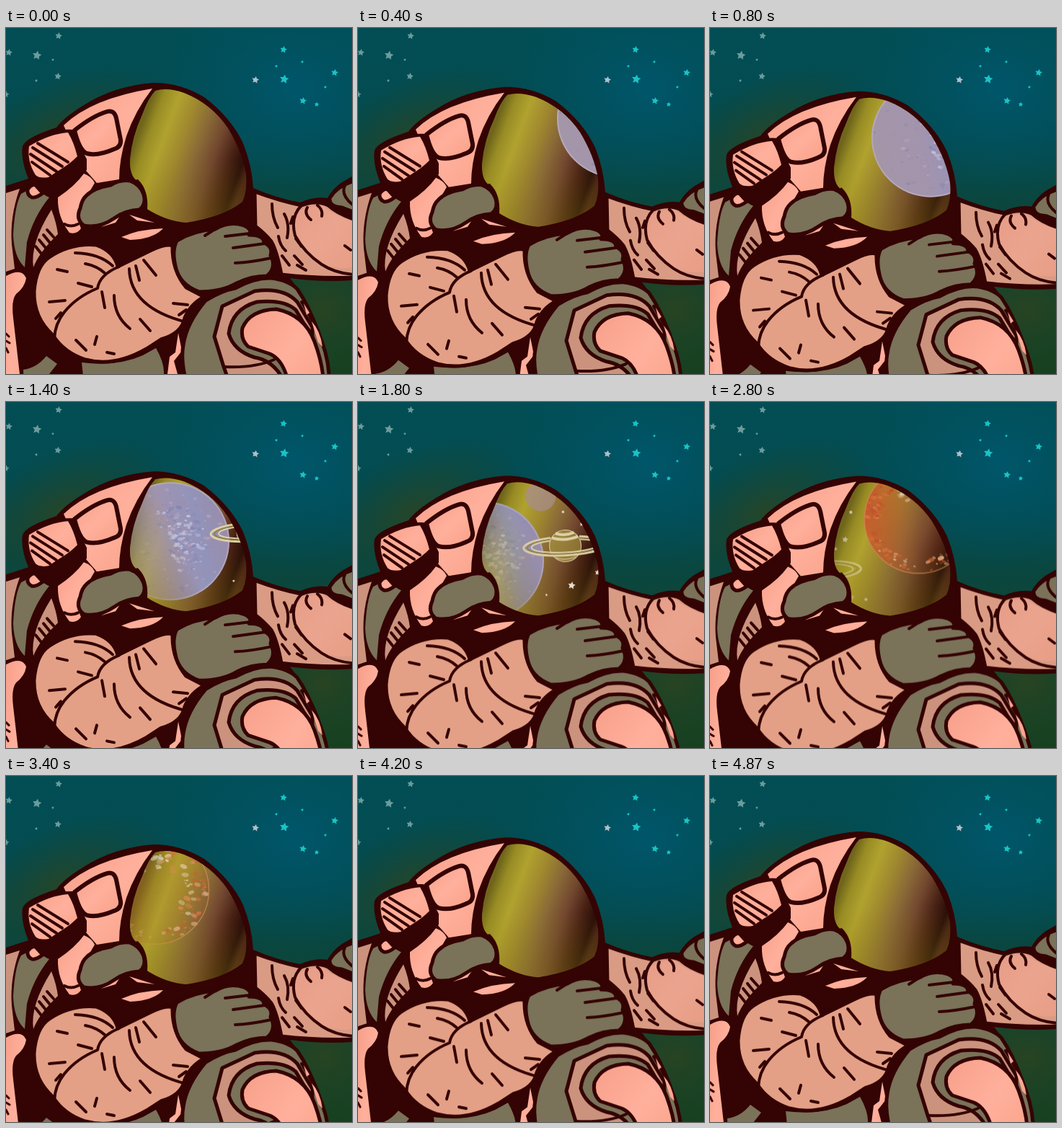
Write an HTML page that moves like this. It is 480 by 480 pixels and loops after 4.94 s.

```html
<!DOCTYPE html>
<html lang="en">
<head>
<meta charset="utf-8">
<title>Astronaut</title>
<style>
html, body { margin: 0; width: 100%; height: 100%; overflow: hidden; background: #034a4d; }
svg { display: block; width: 100%; height: 100%; }
.ink { fill: none; stroke: #340303; stroke-width: 4; stroke-linecap: round; stroke-linejoin: round; }
.part { stroke: #340303; stroke-width: 5; stroke-linejoin: round; }
.dark { fill: #340303; }
.skin { fill: url(#skin); }
.arm { fill: #e3a086; }
.dim { fill: #cb927d; }
.grey { fill: #7a7259; }
</style>
</head>
<body>
<svg viewBox="0 0 480 480">
  <defs>
    <linearGradient id="sky" x2="0" y2="1">
      <stop offset="0" stop-color="#024e54"/>
      <stop offset=".3" stop-color="#034b51"/>
      <stop offset=".47" stop-color="#094741"/>
      <stop offset=".7" stop-color="#13432e"/>
      <stop offset="1" stop-color="#17401f"/>
    </linearGradient>
    <radialGradient id="glow">
      <stop offset="0" stop-color="#00566a"/>
      <stop offset=".45" stop-color="#005466" stop-opacity=".6"/>
      <stop offset="1" stop-color="#005466" stop-opacity="0"/>
    </radialGradient>
    <radialGradient id="moss">
      <stop offset="0" stop-color="#2d4420" stop-opacity=".8"/>
      <stop offset="1" stop-color="#1c4428" stop-opacity="0"/>
    </radialGradient>
    <linearGradient id="skin" x2="1" y2="1">
      <stop offset="0" stop-color="#f79f8a"/>
      <stop offset=".5" stop-color="#ffb09c"/>
      <stop offset="1" stop-color="#f9a088"/>
    </linearGradient>
    <linearGradient id="gold" gradientUnits="userSpaceOnUse" x1="175" y1="170" x2="325" y2="225">
      <stop offset="0" stop-color="#6f651b"/>
      <stop offset=".09" stop-color="#978b24"/>
      <stop offset=".22" stop-color="#b1a22f"/>
      <stop offset=".38" stop-color="#9f882f"/>
      <stop offset=".53" stop-color="#8a6a37"/>
      <stop offset=".69" stop-color="#71462f"/>
      <stop offset=".83" stop-color="#482114"/>
      <stop offset=".94" stop-color="#270c08"/>
      <stop offset="1" stop-color="#451f14"/>
    </linearGradient>
    <linearGradient id="low" gradientUnits="userSpaceOnUse" x1="0" y1="180" x2="0" y2="270">
      <stop offset="0" stop-color="#8c8010" stop-opacity="0"/>
      <stop offset="1" stop-color="#938515" stop-opacity=".35"/>
    </linearGradient>
    <linearGradient id="fade" gradientUnits="userSpaceOnUse" x1="172" y1="230" x2="250" y2="195">
      <stop offset="0" stop-color="#444"/>
      <stop offset="1" stop-color="#fff"/>
    </linearGradient>
    <linearGradient id="lilac" x1="0" y1=".6" x2="1" y2=".4">
      <stop offset="0" stop-color="#a496a8"/>
      <stop offset=".4" stop-color="#a394ad"/>
      <stop offset=".75" stop-color="#9293ba"/>
      <stop offset="1" stop-color="#9a8ca8"/>
    </linearGradient>
    <linearGradient id="ember">
      <stop offset="0" stop-color="#c9542e" stop-opacity=".95"/>
      <stop offset=".25" stop-color="#bd552c" stop-opacity=".6"/>
      <stop offset=".5" stop-color="#b5632c" stop-opacity=".15"/>
      <stop offset="1" stop-color="#b5632c" stop-opacity=".1"/>
    </linearGradient>
    <path id="glass" d="M207,87Q224,82 247,90Q285,105 308,139Q328,172 333,203Q335,226 328,241Q302,262 250,270Q222,268 194,250Q195,226 182,212Q171,205 172,182Q175,150 189,120Q198,96 207,87Z"/>
    <clipPath id="visor"><use href="#glass"/></clipPath>
    <mask id="veil" maskUnits="userSpaceOnUse" x="150" y="70" width="200" height="210">
      <rect x="150" y="70" width="200" height="210" fill="url(#fade)"/>
    </mask>
  </defs>

  <rect width="480" height="480" fill="url(#sky)"/>
  <ellipse cx="400" cy="85" rx="190" ry="150" fill="url(#glow)"/>
  <ellipse cx="75" cy="150" rx="160" ry="80" fill="url(#moss)" transform="rotate(-25 75 150)"/>
  <ellipse cx="440" cy="390" rx="110" ry="90" fill="url(#moss)"/>
  <g id="sparks"></g>

  <g id="body">
    <path class="dark" d="M0,219L31,209Q20,182 23,164Q27,152 70,138Q80,124 108,107Q150,80 205,76Q242,76 275,96Q312,124 329,160Q341,190 343,222Q375,236 408,242Q428,233 446,236Q454,222 466,214L480,206V350Q438,353 394,347Q414,372 428,402Q444,436 450,480L452,530H0Z"/>

    <!-- left shoulder and hand -->
    <path class="dim" d="M0,229L19,223Q5,262 8,300L12,334L0,338Z"/>
    <path class="grey" d="M21,230L38,221Q56,234 60,235Q38,262 29,297L26,332Q11,318 10,287Q12,246 21,230Z"/>
    <path class="dim" d="M63,252Q70,270 72,286Q46,311 38,332Q33,300 63,252Z"/>
    <path class="ink" d="M52,287l9,11M46,294l9,11M41,303l8,10M57,280l9,10"/>
    <path class="skin" d="M0,344Q22,332 28,347Q26,360 14,369Q7,378 10,402L19,480V530H0Z"/>
    <path class="ink" style="stroke-width:3" d="M0,424l4,4M0,434l5,3M0,444l3,6"/>
    <path class="grey" d="M24,474Q42,472 56,455L71,466L60,480V530H26Z"/>
    <path class="grey" d="M105,464Q155,470 190,454L208,444Q220,465 219,480V530H112Z"/>
    <path class="skin" d="M239,423L244,448L233,462L238,480H224L227,456L235,450Z"/>

    <!-- head -->
    <path class="skin" d="M80,135Q118,98 203,84Q179,115 167,150Q157,182 157,210L126,215L104,190Z"/>
    <path class="part skin" style="stroke-width:6" d="M95,142Q120,122 140,116Q150,113 153,125L159,155Q160,165 150,168Q127,178 112,174Q102,170 95,142Z"/>
    <path class="dark" d="M24,163Q60,139 92,141L112,182L112,197L64,233L34,212Z"/>
    <path class="skin" d="M32,164Q60,147 86,145Q94,158 99,178Q90,187 82,192L59,207Q46,209 41,204Q29,185 32,164Z"/>
    <path class="ink" d="M44,160L86,186M37,166L78,192M34,175L70,199M36,186L61,204"/>
    <path class="part skin" d="M30,224Q36,216 41,218L51,229Q42,236 36,235Q29,232 30,224Z"/>
    <path class="skin" d="M72,235Q96,219 108,202Q119,206 123,215L113,232Q99,245 98,262L104,278Q98,287 88,284Q71,262 72,235Z"/>
    <path class="ink" d="M81,272Q90,277 100,272"/>
    <path class="skin" d="M160,290Q185,279 218,278Q204,293 172,294Z"/>
    <path class="skin" d="M171,259L206,270L182,267ZM132,276L158,261L152,270Z"/>
    <path class="part grey" d="M112,232Q122,222 145,218Q158,210 172,212Q186,217 191,231Q195,245 185,252Q165,253 150,264Q130,278 108,274Q96,265 103,250Q105,238 112,232Z"/>

    <use href="#glass" fill="url(#gold)"/>
    <use href="#glass" fill="url(#low)"/>
    <g clip-path="url(#visor)"><g mask="url(#veil)">
      <g id="moon"></g>
      <g id="ringed"></g>
      <g id="fire"></g>
    </g></g>
    <path class="ink" d="M194,251Q196,226 182,212"/>

    <!-- right arm -->
    <path class="part dim" style="fill:#da9b84" d="M345,227Q380,240 410,246Q430,238 447,246Q460,258 485,266V346Q432,348 382,342Q376,310 368,296Q360,286 346,275Z"/>
    <path class="skin" opacity=".45" d="M402,258Q412,248 438,246Q456,260 480,268V332Q452,337 428,320Q396,296 402,258Z"/>
    <path class="ink" d="M410,246Q394,262 401,288Q414,312 438,328Q456,340 482,342M369,244Q369,263 377,277M386,258Q394,272 390,291M418,249Q413,258 423,266M432,246Q440,252 438,261M378,289Q380,302 388,309M402,292l8,11M383,316l10,13M400,316l11,12M404,329l12,7M398,262l-3,9M470,302l8,6"/>
    <path class="part grey" d="M484,212Q460,218 449,236Q448,248 466,249L484,256Z"/>
    <path class="ink" d="M470,219Q464,232 482,246"/>

    <!-- front arm -->
    <path class="part arm" d="M60,318Q90,298 125,301Q150,310 155,331L200,309Q222,298 231,302Q230,336 250,360L275,373Q256,383 248,402Q244,424 215,432L195,445Q150,471 110,460Q80,450 65,426Q38,402 39,365Q42,330 60,318Z"/>
    <path class="ink" d="M157,331Q130,342 127,361Q98,373 81,394Q68,410 67,431M133,366L137,388M171,334Q172,388 250,408M191,322L208,343M180,330l5,20M71,335l14,3M100,354l19,5M60,380l22,-2M150,371Q150,400 172,417M97,433l14,14M126,428l-3,11M186,404l14,16M140,450l10,2M96,312Q130,313 148,330M110,327Q126,330 137,340M232,382l20,2M240,398l10,-7M76,395l-7,8"/>
    <path class="part grey" d="M237,295Q260,281 290,279Q310,267 330,274Q343,280 337,287Q358,287 358,298Q371,304 367,315Q376,332 362,344Q340,344 320,354Q300,366 268,366Q240,356 235,330Q230,308 237,295Z"/>
    <path class="ink" d="M304,289L338,285M315,305L359,299M318,326Q340,325 368,319M276,288l14,-9"/>

    <!-- knee -->
    <path class="part grey" d="M246,440Q250,410 277,378Q300,364 318,361Q345,346 368,347Q392,350 404,362Q420,385 432,420Q446,450 448,480V530H262Q240,470 246,440Z"/>
    <path class="part dim" d="M289,428L300,386L345,365Q385,359 404,380L425,415V520H320L302,470Z"/>
    <path class="part grey" d="M309,424Q313,390 348,380Q385,376 402,391L425,430V500H390Q376,462 345,457Q316,448 309,424Z"/>
    <path class="part skin" d="M328,416Q339,391 375,390Q414,398 428,435Q438,462 440,485V530H396Q394,464 366,452L336,442Q325,432 328,416Z"/>
    <path class="ink" d="M303,470Q345,472 372,460M410,380Q426,405 440,440"/>
    <path class="skin" d="M413,382L421,395L417,398ZM424,407Q436,420 439,442L433,436Z"/>
  </g>
</svg>
<script>
const LOOP = 4940, FPS = 15, STEPS = 74;
const $ = id => document.getElementById(id);

let seed = 11;
const rnd = () => (seed = seed * 16807 % 2147483647) / 2147483647;

function star(x, y, r, fill) {
  let d = '';
  for (let i = 0; i < 10; i++) {
    const a = i * Math.PI / 5 - 1.4, k = i % 2 ? r * .5 : r;
    d += (i ? 'L' : 'M') + (x + k * Math.cos(a)).toFixed(1) + ',' + (y + k * Math.sin(a)).toFixed(1);
  }
  return `<path d="${d}Z" fill="${fill}"/>`;
}
const stars = (list, fill) => list.map(([x, y, r]) => star(x, y, r, fill)).join('');

// Irregular speckles in a ring sector around the centre
function specks(n, r0, r1, a0, a1, size, fills) {
  let out = '';
  for (let i = 0; i < n; i++) {
    const r = r0 + (r1 - r0) * rnd(), a = a0 + (a1 - a0) * rnd(), s = size * (.3 + rnd());
    out += `<ellipse cx="${(r * Math.cos(a)).toFixed(1)}" cy="${(r * Math.sin(a)).toFixed(1)}" rx="${s.toFixed(1)}" ry="${(s * .6).toFixed(1)}" fill="${fills[i % fills.length]}" opacity="${(.35 + .5 * rnd()).toFixed(2)}" transform="rotate(${Math.round(rnd() * 60 - 30)})"/>`;
  }
  return out;
}

$('sparks').innerHTML =
  stars([[43, 38, 6.5], [73, 11, 5], [4, 34, 5], [72, 67, 5], [65, 44, 2], [42, 73, 2.2], [0, 92, 4.5]], '#6b9c9c') +
  stars([[385, 30, 5], [375, 53, 2.3], [411, 47, 2.3], [386, 71, 6.5], [456, 62, 5.2], [443, 82, 2.3], [412, 101, 5.2], [431, 106, 3.4]], '#18c4c6') +
  star(346, 72, 5.2, '#b3bfca');

$('moon').innerHTML = '<circle r="82" fill="url(#lilac)"/>' +
  specks(130, 5, 52, -1.9, 1.1, 3.2, ['#b9bfe0', '#c9c6dc', '#7f86b8']) +
  specks(120, 20, 78, -3.1, 3.1, 3, ['#a58aa6', '#8c8bb4', '#b3a5bd']) +
  '<circle r="81" fill="none" stroke="#c7bccb" stroke-width="2" opacity=".5"/>';

$('ringed').innerHTML =
  '<circle cx="-34" cy="-65" r="21" fill="#a98d8c" opacity=".75"/>' +
  stars([[10, -90, 3.5], [44, -77, 3], [36, -39, 4.5], [23, -26, 3], [-3, -43, 2.5], [9, 59, 5.5], [45, 41, 4], [65, 44, 3], [-26, 72, 2]], '#e6ddd0') +
  `<g transform="rotate(-3)" fill="none" stroke="#dcd0a6">
    <circle cy="4" r="22" fill="#a8973f" fill-opacity=".65" stroke-width="1"/>
    <path d="M-13,-14Q0,-9 13,-14M-18,-8Q0,-2 18,-8" stroke-width="4"/>
    <path d="M-20,12Q0,19 20,12M-14,20Q0,25 14,20" stroke-width="2" opacity=".6"/>
    <path d="M-20,-8A58,13 0 1 0 20,-8" stroke-width="3"/>
    <path d="M-21,-4A47,9 0 1 0 21,-4" stroke-width="2"/>
    <path d="M-21,-6A53,11 0 1 0 21,-6" stroke="#8f7c43" stroke-width="1.5"/>
  </g>`;

$('fire').innerHTML = '<circle r="76" fill="url(#ember)"/>' +
  specks(90, 56, 73, -.8, 3.1, 3.6, ['#d9733f', '#c9602f', '#e0b48c']) +
  specks(45, 50, 72, 2.6, 4.6, 3.6, ['#d9733f', '#c44a2a']) +
  specks(26, 36, 60, -1.2, .6, 4, ['#d9894f', '#dccba4']) +
  specks(24, 30, 50, -1.9, -1.2, 4, ['#ddd8c4', '#d3c6b4']) +
  '<circle r="75.3" fill="none" stroke="#dc9a62" stroke-width="1.4" opacity=".6"/>';

const place = (id, x, y) => $(id).setAttribute('transform', `translate(${x.toFixed(2)} ${y.toFixed(2)})`);

function draw(ms) {
  // Steps start on times rounded to 10 ms
  const t = Math.min(STEPS - 1, Math.floor((ms + 3.4) * FPS / 1000)) / FPS;
  const peak = 2.27, end = LOOP / 1000;
  place('body', 0, 33 * (t < peak ? t / peak : (end - t) / (end - peak)));
  const drift = (id, t0, x, y, vx, vy) => place(id, x + vx * (t - t0), y + vy * (t - t0));
  drift('moon', .8, 306, 141, -130, 53);
  drift('ringed', 2.2, 233, 183, -136, 34);
  drift('fire', 2.2, 373, 133, -139, 5);
}

const start = performance.now();
function tick() {
  draw((performance.now() - start) % LOOP);
  requestAnimationFrame(tick);
}
tick();
</script>
</body>
</html>
```
